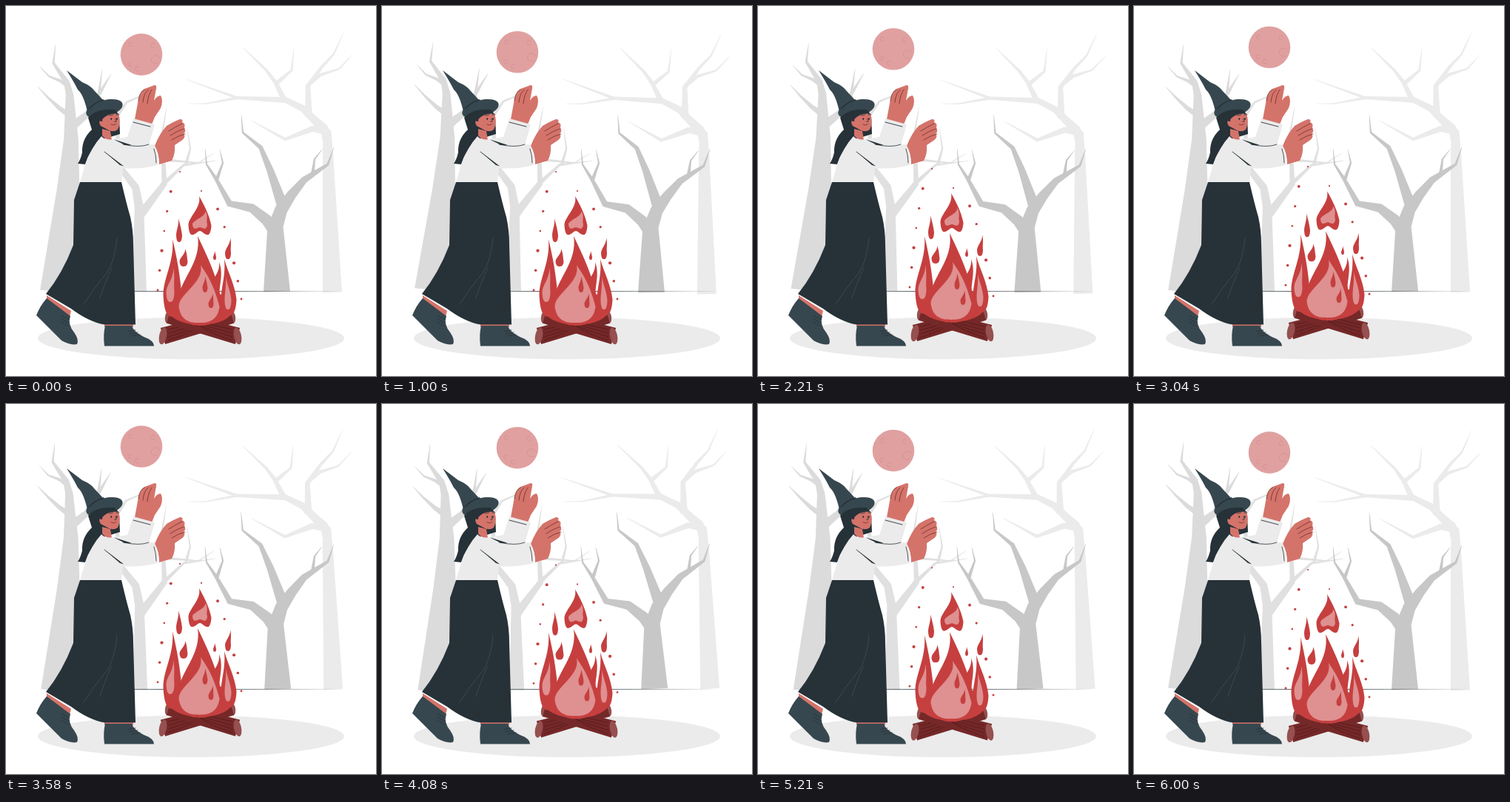
Animation, 500 px wide and 500 px high, one loop 6.04 s. Source, as an HTML page with a canvas:

```html
<!DOCTYPE html>
<html lang="en">
<head>
<meta charset="utf-8">
<title>Witch by the campfire</title>
<style>
html, body { margin: 0; width: 100%; height: 100%; overflow: hidden; background: #fff; }
canvas { display: block; width: 500px; height: 500px; }
</style>
</head>
<body>
<canvas id="stage"></canvas>
<script>
const canvas = document.getElementById('stage');
const ctx = canvas.getContext('2d');
const dpr = window.devicePixelRatio || 1;
canvas.width = canvas.height = 500 * dpr;

const LOOP = 6040, PERIOD = 6000;
const INK = '#263238', SLATE = '#37474f', SKIN = '#d4736a', CREASE = '#6e302d', CLOTH = '#ebebeb';
const RED = '#c63f3f', PINK = '#df9090', BARK = '#752828', GRAIN = '#551b1b';

function fill(d, color) {
  ctx.fillStyle = color;
  ctx.fill(new Path2D(d));
}

function line(d, color, width = 0.8) {
  ctx.strokeStyle = color;
  ctx.lineWidth = width;
  ctx.lineCap = ctx.lineJoin = 'round';
  ctx.stroke(new Path2D(d));
}

function oval(x, y, rx, ry, color, turn = 0) {
  ctx.fillStyle = color;
  ctx.beginPath();
  ctx.ellipse(x, y, rx, ry, turn, 0, 7);
  ctx.fill();
}

// Polyline through x, y pairs that narrows from w0 to w1 along its length.
function limb(color, w0, w1, ...xy) {
  const pts = [], left = [], right = [];
  let length = 0;
  for (let i = 0; i < xy.length; i += 2) {
    if (i) length += Math.hypot(xy[i] - xy[i - 2], xy[i + 1] - xy[i - 1]);
    pts.push({ x: xy[i], y: xy[i + 1], at: length });
  }
  pts.forEach((p, i) => {
    const a = pts[Math.max(i - 1, 0)], b = pts[Math.min(i + 1, pts.length - 1)];
    const turn = Math.atan2(b.y - a.y, b.x - a.x);
    const half = (w1 + (w0 - w1) * (1 - p.at / length) ** 1.1) / 2;
    const dx = -Math.sin(turn) * half, dy = Math.cos(turn) * half;
    left.push([p.x + dx, p.y + dy]);
    right.unshift([p.x - dx, p.y - dy]);
  });
  fill('M' + left.concat(right).join('L') + 'Z', color);
}

const grower = color => (width, ...xy) => limb(color, width, 0.5, ...xy);

function drawTrees() {
  let grow = grower('#ebebeb');
  grow(26, 441, 387, 435, 200, 434, 172, 402, 139, 378, 127, 312, 124, 243, 99);
  grow(13, 434, 180, 430, 165, 398, 135, 360, 125);
  grow(10, 409, 150, 408, 108, 427, 82, 443, 65, 456, 36);
  grow(6, 412, 103, 425, 93, 450, 85, 468, 66);
  grow(8, 377, 129, 364, 103, 352, 87, 320, 56);
  grow(6, 366, 104, 386, 87, 389, 57);
  grow(10, 432, 169, 414, 166, 377, 180, 332, 155);
  grow(4, 314, 124, 270, 132, 247, 132);

  grow = grower('#e0e0e0');
  grow(20, 180, 386, 180, 272, 175, 245, 152, 215, 150, 150, 163, 130, 205, 112);
  grow(12, 181, 283, 214, 240, 213, 215, 208, 190, 217, 137);
  grow(6, 210, 243, 240, 215, 284, 209);
  grow(4, 215, 208, 260, 212, 281, 199);
  grow(4, 243, 214, 249, 193, 245, 166);

  grow = grower('#dbdbdb');
  grow(54, 73, 386, 84, 250, 88, 180, 86, 120, 82, 103, 64, 77, 67, 52);
  grow(6, 85, 109, 73, 101, 58, 95, 46, 82);
  grow(8, 85, 147, 72, 138, 57, 124, 43, 109);
  grow(12, 90, 162, 110, 146, 125, 122, 130, 86);
  grow(5, 126, 119, 142, 92);

  grow = grower('#c7c7c7');
  grow(36, 366, 386, 364, 298, 372, 275, 386, 255, 403, 235, 435, 214, 443, 191);
  grow(5, 414, 229, 417, 207, 427, 194);
  grow(15, 373, 268, 357, 222, 344, 191, 320, 171, 318, 147);
  grow(17, 362, 302, 352, 289, 332, 273, 302, 267, 284, 234, 271, 214, 269, 193);
  grow(5, 285, 234, 293, 212, 289, 194);
}

function drawMoon() {
  oval(183, 65.6, 28.3, 28.3, '#e0a0a0');
  [20, 107, 140, 223, 321].forEach((deg, i) => {
    const a = deg * Math.PI / 180, r = i ? 2.8 : 5.5;
    ctx.strokeStyle = '#d68f8f';
    ctx.lineWidth = 0.8;
    ctx.beginPath();
    ctx.arc(183 + 20 * Math.cos(a), 65.6 + 20 * Math.sin(a), r, 1, 5.9);
    ctx.stroke();
  });
}

function drawSkirt() {
  fill('M55 391L88 412 86 420 55 396ZM133 428H172V434H133Z', SKIN);
  fill('M55 395L87 419Q83 430 92 441 99 451 96 457 87 459 75 452L41 418Q46 405 55 395Z', SLATE);
  fill('M134 432H170Q172 440 186 447 200 452 200 459.5H133Q131 445 134 432Z', SLATE);
  for (let i = 0; i < 3; i++) {
    line(`M${76 - i} ${419 + i * 4}l9 5M${164 + i * 3} ${440 + i * 3}l11 -2`, INK);
  }
  fill('M100 238H156Q163 268 168 285 172 303 172 322L175 430.5H133Q112 427 88 409L54 389Q76 362 91 323L92 262Z', INK);
  line('M150 313Q147 345 136 361 118 382 105 403M143 354Q134 372 127 395', '#3d4f58');
}

function drawBackArm() {
  fill('M174 153L179 126Q181 117 187 112L198 108Q204 105 203 111L200 128Q204 121 209 121 213 127 209 138L201 150 197 160Z', SKIN);
  for (let i = 0; i < 3; i++) line(`M${179 + i * 6} ${128 + i * 2}q1 -12 ${8 - i} -${15 + i * 2}`, CREASE);
  fill('M146 180L164 177 172 152 201 160 193 188 169 195Z', CLOTH);
  line('M172 157L195 163', INK, 0.9);
}

function drawHead() {
  fill('M112 146Q119 158 116 167 102 180 103 198 101 207 97 213L107 214Q112 196 128 181L154 173 153 150Z', INK);
  fill('M130 166L141 169 143 181Q135 182 130 175Z', SKIN);
  oval(133, 139, 25.5, 11.5, SLATE, -0.28);
  fill('M111 151Q122 138 147 140L153 147 132 152 126 167 116 167Z', INK);
  fill('M131 152Q140 144 152 146 156 156 151 167 146 171 139 168 132 164 128 162 125 158 127 154Z', SKIN);
  fill('M130 156Q130 149 138 147L144 142 126 146 124 155Z', INK);
  [142.3, 150].forEach(x => oval(x, 152.5, 0.9, 1.6, INK));
  line('M139.5 148l5 -1M149 147h3M148 152L149 156 146.5 156.5', INK);
  line('M142 160Q147 162 149 159', CREASE);
  fill('M82 87L103 103Q115 108 119 114L133 129 110 143Q105 120 97 113 92 103 82 87Z', SLATE);
  line('M112 139Q120 130 132 127', INK, 1.5);
}

function drawTorso() {
  fill('M129 176Q134 182 144 180L156 187 180 189 200 187Q206 202 205 215 180 221 158 219L156 238H100L107 214Q116 190 129 176Z', CLOTH);
  fill('M145 180L170 188 161 188ZM133 197L158 216 154 215Z', INK);
  line('M133 197L158 216M158 187Q181 192 193 187M200 193Q203 202 203 212', INK);
  fill('M201 189Q207 173 217 162 227 156 235 153 240 153 238 157 243 159 241 164 244 169 240 173 244 177 237 182L228 188Q229 200 224 209L207 214Q207 199 201 189Z', SKIN);
  for (let i = 0; i < 3; i++) line(`M${220 + i * 2} ${169 + i * 6}q9 -6 18 -${10 - i}`, CREASE);
}

function drawLog(side) {
  const x = d => 262.5 + side * d;
  oval(x(-43), 420, 4.5, 9, '#965050', side * 0.2);
  limb(BARK, 23, 18, x(50.5), 446, x(-43), 420);
  for (let i = 0; i < 4; i++) {
    line(`M${x(43)} ${437 + i * 5}Q${x(15)} ${431 + i * 4} ${x(i * 8 - 25)} ${420 + i * 4}`, GRAIN);
  }
  oval(x(50.5), 446, 5, 11.5, '#965050', -side * 0.2);
}

// Teardrop standing on x, y; the notch hollows out its foot.
function flame(color, x, y, w, h, lean = 0, notch = 0) {
  const tip = x + lean, foot = y - notch;
  ctx.fillStyle = color;
  ctx.beginPath();
  ctx.moveTo(tip, y - h);
  ctx.bezierCurveTo(tip + w * 0.25, y - h * 0.75, x + w * 0.4, y - h * 0.55, x + w * 0.5, y - h * 0.28);
  ctx.bezierCurveTo(x + w * 0.45, y + notch, x + w * 0.15, foot, x, foot);
  ctx.bezierCurveTo(x - w * 0.15, foot, x - w * 0.45, y + notch, x - w * 0.5, y - h * 0.28);
  ctx.bezierCurveTo(x - w * 0.5, y - h * 0.5, tip + w * 0.1, y - h * 0.7, tip, y - h);
  ctx.fill();
}

function drawFlames() {
  oval(263, 408, 45, 23, RED);
  flame(RED, 262, 432, 58, 121, -3);
  flame(RED, 275, 420, 28, 74, 13);
  flame(RED, 225, 420, 25, 105);
  flame(RED, 301, 418, 21, 76, -6);
  flame(PINK, 261, 428, 55, 78, 2);
  flame(PINK, 222, 400, 11, 46, 4);
  flame(PINK, 300, 410, 9, 44, -3);
  flame(RED, 269, 387, 7, 22);
  flame(RED, 277, 408, 7, 20, 2);
  flame(RED, 262, 312, 31, 55, -1, 8);
  flame(PINK, 262, 302, 20, 25, 7, 3);
  flame(RED, 234, 319, 8, 32, -1);
  flame(RED, 240, 352, 11, 24, 2);
  flame(RED, 300, 342, 8, 29, 3);
  flame(RED, 282, 343, 4, 12);
}

function drawSparks() {
  for (let i = 0; i < 7; i++) {
    const u = i / 6, r = 1.1 + (i * 5 % 7) / 6;
    oval(235 - 30 * Math.sqrt(u), 224 + 160 * u, r, r, RED);
    oval(264 + 54 * Math.sqrt(u), 250 + 146 * u, r, r, RED);
  }
}

function drawFire() {
  drawLog(-1);
  drawLog(1);
  drawFlames();
  drawSparks();
}

const wrap = p => p - Math.floor(p);
const lift = p => -10 * (1 - Math.abs(1 - 2 * wrap(p)));
const sway = p => 1 - Math.abs(4 * wrap(p + 0.25) - 2);

function shifted(dy, draw) {
  ctx.save();
  ctx.translate(0, dy);
  draw();
  ctx.restore();
}

function render(time) {
  const p = (time % LOOP) / PERIOD;
  const delay = 1 / 12;
  ctx.setTransform(dpr, 0, 0, dpr, 0, 0);
  ctx.fillStyle = '#fff';
  ctx.fillRect(0, 0, 500, 500);

  ctx.save();
  ctx.translate(256, 211);
  ctx.rotate(sway(p) * Math.PI / 180);
  ctx.translate(-256, -211);
  drawTrees();
  ctx.restore();

  fill('M46 385.8Q250 384.9 455 385.8 250 386.7 46 385.8Z', INK);
  oval(250, 449, 207, 28.3, CLOTH);
  shifted(lift(p), drawMoon);
  drawSkirt();
  drawBackArm();
  drawHead();
  drawTorso();
  shifted(lift(p - delay) - lift(-delay), drawFire);
}

const start = performance.now();
function tick() {
  render(performance.now() - start);
  requestAnimationFrame(tick);
}
tick();
</script>
</body>
</html>
```
